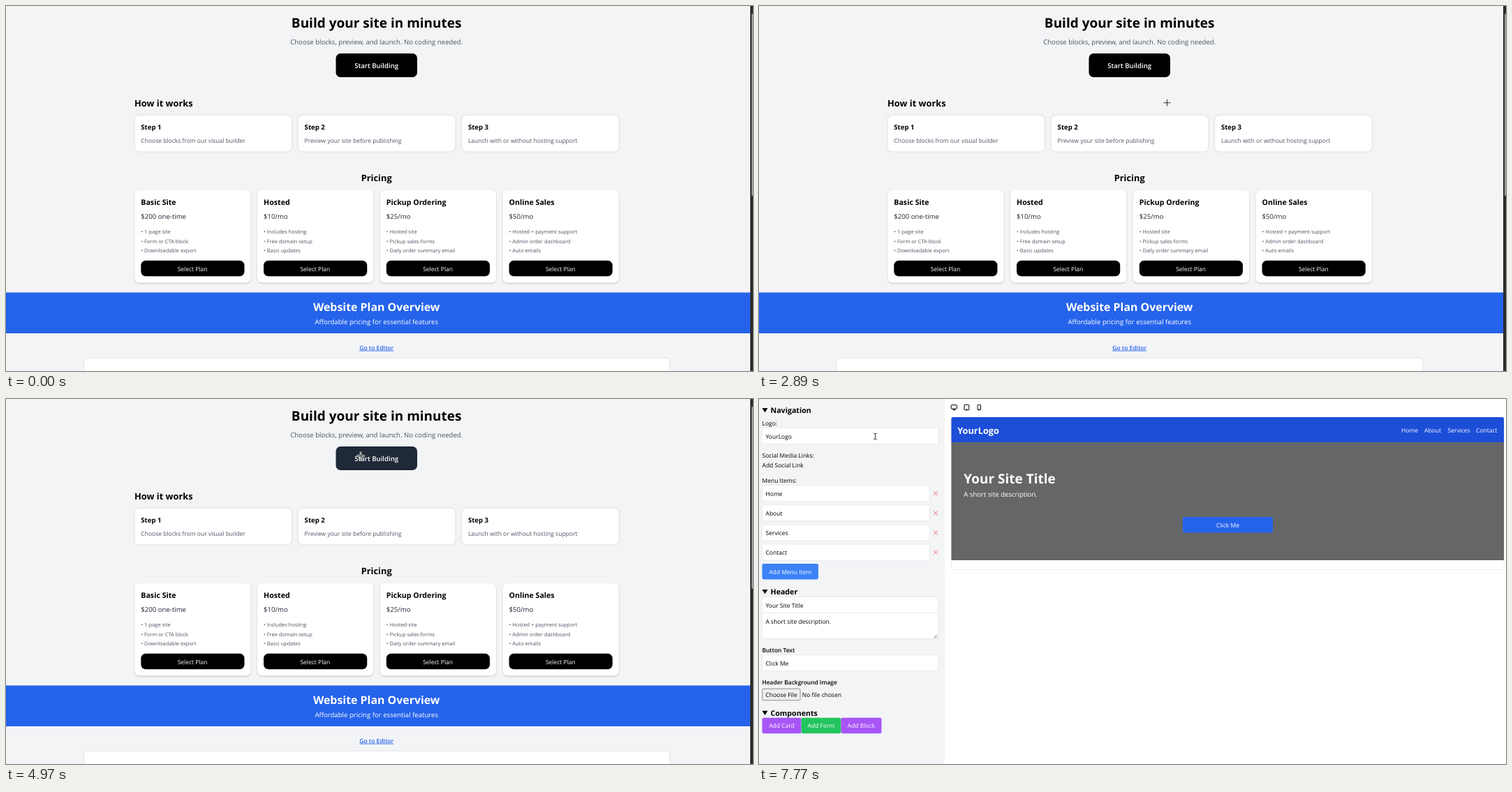
An HTML page that plays this animation: 1070 px wide and 523 px high, repeating every 8 s.

```html
<!DOCTYPE html>
<html lang="en">
<head>
<meta charset="utf-8">
<title>Site builder</title>
<style>
html, body { margin: 0; width: 100%; height: 100%; overflow: hidden; }
svg { display: block; width: 1070px; height: 523px; font-family: "Open Sans", "Noto Sans", sans-serif; }
.card { filter: drop-shadow(0 .6px .8px #0002); }
.raised { filter: drop-shadow(0 1.4px 1.3px #0003); }
</style>
</head>
<body>
<svg id="stage" viewBox="0 0 1070 523" text-rendering="geometricPrecision"></svg>
<script>
const LOOP = 8000, CLICK = 4970, SWITCH = 5050;
const GRAY = '#4b5563', PAGE = '#f3f4f6', BLUE = '#2563eb', LINE = '#e5e7eb';
const BASE = 8.5, LARGE = 9.6, XL = 10.65, XXL = 12.8;

const rect = (x, y, w, h, fill, r = 0, extra = '') =>
  `<rect x="${x}" y="${y}" width="${w}" height="${h}" rx="${r}" fill="${fill}" ${extra}/>`;
const path = (d, stroke, width = 1, fill = 'none') =>
  `<path d="${d}" stroke="${stroke}" stroke-width="${width}" fill="${fill}"/>`;
// y is the middle of the capital letters
const text = (x, y, size, str, fill = '#000', weight = 400, extra = '') =>
  `<text x="${x}" y="${y + size * .357}" font-size="${size}" fill="${fill}" font-weight="${weight}" ${extra}>${str}</text>`;
const centered = (x, y, size, str, fill, weight, extra = '') =>
  text(x, y, size, str, fill, weight, 'text-anchor="middle" ' + extra);

function landing() {
  const steps = ['Choose blocks from our visual builder', 'Preview your site before publishing',
    'Launch with or without hosting support'];
  const plans = [
    ['Basic Site', '$200 one-time', '1-page site', 'Form or CTA block', 'Downloadable export'],
    ['Hosted', '$10/mo', 'Includes hosting', 'Free domain setup', 'Basic updates'],
    ['Pickup Ordering', '$25/mo', 'Hosted site', 'Pickup sales forms', 'Daily order summary email'],
    ['Online Sales', '$50/mo', 'Hosted + payment support', 'Admin order dashboard', 'Auto emails']];
  return rect(0, 0, 1070, 523, PAGE)
    + centered(530.7, 24.3, 19, 'Build your site in minutes', '#000', 700)
    + centered(530.7, 51.3, LARGE, 'Choose blocks, preview, and launch. No coding needed.', GRAY)
    + rect(472.5, 68, 116.5, 34, '#000', 6.75, 'id="start"')
    + centered(530.7, 85.5, LARGE, 'Start Building', '#fff', 600)
    + text(184, 139.2, XXL, 'How it works', '#000', 700)
    + steps.map((desc, i) => {
        const x = 184.3 + i * 234.3;
        return rect(x, 156.6, 225, 51.8, '#fff', 6.75, `class="card" stroke="${LINE}" stroke-width=".6"`)
          + text(x + 9, 174, LARGE, 'Step ' + (i + 1), '#000', 700)
          + text(x + 9, 193.2, BASE, desc, GRAY);
      }).join('')
    + centered(530.7, 246, XXL, 'Pricing', '#000', 700)
    + plans.map(([name, price, ...items], i) => {
        const x = 184.3 + i * 175.75;
        return rect(x, 264, 166.3, 132.5, '#fff', 6.75, 'class="raised"')
          + text(x + 9, 281.3, XL, name, '#000', 700)
          + text(x + 9, 301.2, LARGE, price, '#1f2937')
          + items.map((item, k) => text(x + 9, 323.5 + k * 13.5, 7.45, '• ' + item, GRAY)).join('')
          + rect(x + 9, 364.8, 148.2, 22.5, '#000', 6.75)
          + centered(x + 82.8, 376.6, BASE, 'Select Plan', '#fff');
      }).join('')
    + rect(0, 410.5, 1066, 58.5, BLUE)
    + centered(530.7, 431, 15.9, 'Website Plan Overview', '#fff', 700)
    + centered(530.7, 452.7, LARGE, 'Affordable pricing for essential features', '#fff')
    + centered(530.7, 489.6, BASE, 'Go to Editor', BLUE, 600, 'text-decoration="underline"')
    + rect(112, 505, 838, 30, '#fff', 4, 'class="card"')
    + rect(1066, 0, 4, 523, '#2c2c2c')
    + rect(1068, 11, 2, 261, '#9a9a9a', 1);
}

function editor() {
  const field = (y, str, w = 252, h = 23) =>
    rect(4.5, y, w, h, '#fff', .5, `stroke="${LINE}" stroke-width=".8"`) + text(9.5, y + 12, BASE, str);
  const heading = (y, str) =>
    path(`M4.5 ${y - 3}h8l-4 6.2z`, 'none', 0, '#000') + text(16.5, y, XL, str, '#000', 700);
  const button = (x, y, w, str, fill) =>
    rect(x, y, w, 22.4, fill, 2.3) + centered(x + w / 2, y + 11.5, BASE, str, '#fff');
  const menu = ['Home', 'About', 'Services', 'Contact'];
  const links = [920, 953, 986.5, 1027];
  return rect(0, 0, 1070, 523, '#fff') + rect(0, 0, 266, 523, PAGE)
    + heading(16, 'Navigation')
    + text(4.5, 34.8, BASE, 'Logo:') + field(41.5, 'YourLogo')
    + text(4.5, 81, BASE, 'Social Media Links:')
    + text(4.5, 94.5, BASE, 'Add Social Link')
    + text(4.5, 117, BASE, 'Menu Items:')
    + menu.map((name, i) => {
        const y = 123.7 + i * 28.1;
        return field(y, name, 240) + path(`M250 ${y + 8.6}l6 6m0-6l-6 6`, '#ef4444', .8)
          + text(links[i], 44.8, BASE, name, '#fff');
      }).reverse().join('')
    + button(4.5, 236, 80.5, 'Add Menu Item', '#3b82f6')
    + heading(276, 'Header')
    + field(283.5, 'Your Site Title')
    + field(306.7, 'A short site description.', 252, 36.8)
    + path('M250.5 342.5l4.5-4.5m-2 4.5l2-2', '#444', .7)
    + text(4.5, 360.2, 8.4, 'Button Text', '#000', 600) + field(366.7, 'Click Me')
    + text(4.5, 406.5, 8.4, 'Header Background Image', '#000', 600)
    + rect(4.8, 415.2, 54.2, 16.5, '#efefef', 1, 'stroke="#767676" stroke-width=".8"')
    + centered(32, 423.8, BASE, 'Choose File') + text(61.8, 423.8, BASE, 'No file chosen')
    + heading(449.7, 'Components')
    + button(4.5, 456.8, 56, 'Add Card', '#a855f7')
    + button(60.5, 456.8, 57, 'Add Form', '#22c55e')
    + button(117.5, 456.8, 58, 'Add Block', '#a855f7')
    // device icons
    + rect(275.3, 8.6, 8.2, 5.4, 'none', .8, 'stroke="#000"') + path('M279.4 14v1.6m-2.2 0h4.4', '#000')
    + rect(294, 8.2, 6.8, 7.6, 'none', .8, 'stroke="#000"') + path('M296.4 14.8h2', '#000')
    + rect(313.1, 8.2, 4.4, 7.6, 'none', .8, 'stroke="#000"') + path('M314.4 14.8h1.8', '#000')
    // preview
    + rect(275.3, 26, 792, 218.5, '#fff', 2.5, `stroke="${LINE}" stroke-width=".8"`)
    + path('M275.5 62V28.5q0-2.5 2.5-2.5h786.5q2.5 0 2.5 2.5V62z', 'none', 0, '#1d4ed8')
    + text(284.2, 45, XXL, 'YourLogo', '#fff', 700)
    + menu.map((name, i) => text(links[i], 44.8, BASE, name, '#fff')).join('')
    + rect(275.5, 62, 791.5, 169, '#666')
    + text(293.3, 114.2, 19, 'Your Site Title', '#fff', 700)
    + text(293.3, 137, LARGE, 'A short site description.', '#fff')
    + rect(607, 169, 129, 22.6, BLUE, 2) + centered(671.5, 180.8, BASE, 'Click Me', '#fff');
}

const cross = 'M-5 0H5M0-5V5';
const hand = 'M-1.3 1a1.3 1.3 0 0 1 2.6 0v4l4.2.9q1.4.3 1.2 1.7l-1 5.6h-5.8l-3.5-4.8q-.6-1.5 1-1.3l1.3.9z';
const beam = 'M-2.3-4.3Q0-4.3 0-3.3Q0-4.3 2.3-4.3M0-3.5V3.5M-2.3 4.3Q0 4.3 0 3.3Q0 4.3 2.3 4.3';

const stage = document.getElementById('stage');
stage.innerHTML = `<g id="landing">${landing()}</g><g id="editor">${editor()}</g><g id="cursor">
  <g id="cross">${path('M-5.7 0H5.7M0-5.7V5.7', '#fff', 2.6) + path(cross, '#111', .9)}</g>
  <g id="hand">${path(hand, '#000', .7, '#fff')}</g>
  <g id="beam">${path(beam, '#222', .9)}</g></g>`;
const el = id => document.getElementById(id);
const show = (id, on) => el(id).setAttribute('display', on ? 'inline' : 'none');

const linear = p => p, smooth = p => p * p * (3 - 2 * p), easeOut = p => p * (2 - p);
// first change, last change, number of hops, target, easing
const moves = [
  [862, 1050, 4, 871, 245, easeOut],
  [1480, 1880, 7, 683.3, 161.3, smooth],
  [2390, 3010, 11, 562.5, 133.7, linear],
  [3390, 3850, 8, 507.6, 87, smooth],
  [3910, 4040, 3, 508, 81.5, easeOut],
  [6480, 6620, 3, 391.5, 78.5, smooth],
  [7050, 7190, 3, 197.3, 29.5, smooth],
  [7440, 7770, 6, 166.5, 53.5, smooth]];

function cursorAt(t) {
  let x = 1020.5, y = 475.5;
  for (const [from, to, hops, tx, ty, ease] of moves) {
    if (t < from) break;
    const hop = Math.floor((t - from) / (to - from) * (hops - 1) + .01) + 1;
    const p = ease(Math.min(1, hop / hops));
    x += (tx - x) * p;
    y += (ty - y) * p;
  }
  return [x, y];
}

function draw(now) {
  const t = now % LOOP, [x, y] = cursorAt(t), editing = t >= SWITCH;
  const onButton = t < CLICK && x > 472 && x < 589 && y > 68 && y < 102;
  const onField = editing && x > 4.5 && x < 256.5 && y > 41.5 && y < 64.5;
  show('landing', !editing);
  show('editor', editing);
  show('cursor', t >= 800);
  show('hand', onButton);
  show('beam', onField);
  show('cross', !onButton && !onField);
  el('cursor').setAttribute('transform', `translate(${x} ${y})`);
  const hover = Math.max(0, Math.min(1, (t - 3860) / 180));
  el('start').setAttribute('fill', `rgb(${31 * hover},${41 * hover},${55 * hover})`);
  requestAnimationFrame(draw);
}
requestAnimationFrame(draw);
</script>
</body>
</html>
```
